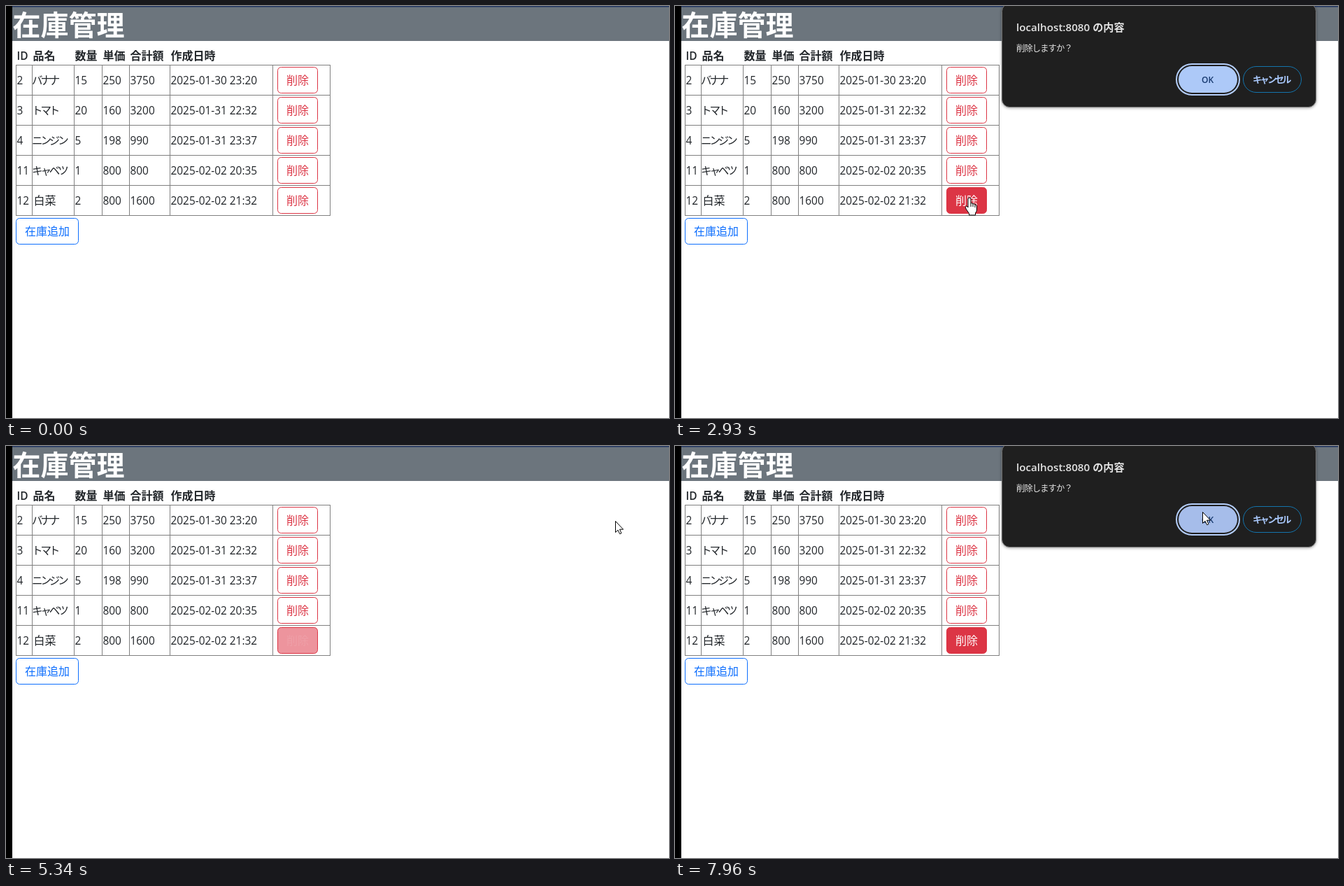
Recreate the animation shown at these times as an HTML page with a canvas. Size 948 by 589 pixels, loop 8000 ms.

```html
<!DOCTYPE html>
<html lang="ja">
<head>
<meta charset="utf-8">
<title>在庫管理</title>
<style>
  html, body { margin: 0; width: 100%; height: 100%; overflow: hidden; background: #fff; }
  canvas { display: block; }
</style>
</head>
<body>
<canvas id="stage" width="948" height="589"></canvas>
<script>
const ctx = document.getElementById("stage").getContext("2d");
const LOOP = 8000;
const FONT = '"Open Sans", "Noto Sans CJK JP", "Noto Sans CJK", sans-serif';
const RED = [220, 53, 69];

const cols = [14, 37, 97, 137, 176, 234, 381, 463];
const heads = ["ID", "品名", "数量", "単価", "合計額", "作成日時"];
const rows = [
  ["2", "バナナ", "15", "250", "3750", "2025-01-30 23:20"],
  ["3", "トマト", "20", "160", "3200", "2025-01-31 22:32"],
  ["4", "ニンジン", "5", "198", "990", "2025-01-31 23:37"],
  ["11", "キャベツ", "1", "800", "800", "2025-02-02 20:35"],
  ["12", "白菜", "2", "800", "1600", "2025-02-02 21:32"]
];
const TOP = 84, ROW = 43;

const easeOut = p => 1 - (1 - p) ** 3;
const easeBoth = p => p < 0.5 ? 2 * p * p : 1 - 2 * (1 - p) ** 2;
const linear = p => p;

// Pointer moves: first step, last step, step count, destination, easing
const startPos = [982, 614];
const moves = [
  [320, 860, 9, 439, 276, easeOut],
  [1060, 1200, 3, 422, 275, easeBoth],
  [1470, 1470, 1, 421, 275, linear],
  [3160, 3790, 10, 734, 112, easeBoth],
  [3860, 3930, 2, 758, 82, linear],
  [4130, 4540, 6, 871, 107, easeBoth],
  [5400, 5970, 9, 454, 276, easeBoth],
  [6040, 6040, 1, 451, 275, linear],
  [6110, 6320, 4, 426, 277, easeOut],
  [7000, 7550, 8, 741, 98, easeBoth],
  [7820, 7960, 3, 754, 94, linear]
];
const clicks = [[2800, 2930], [5200, 5340], [6590, 6730]];
const dialogs = [[2870, 5270], [6660, LOOP]];

const within = (t, spans) => spans.some(([a, b]) => t >= a && t < b);
const ramp = (t, from) => Math.min(1, Math.max(0, (t - from) / 150));
const inBox = (p, x, y, w, h) => p[0] >= x && p[0] <= x + w && p[1] >= y && p[1] <= y + h;

function pointerAt(t) {
  let pos = startPos;
  for (const [t0, t1, n, x, y, ease] of moves) {
    if (t < t0) break;
    const gap = n > 1 ? (t1 - t0) / (n - 1) : 1;
    const step = Math.min(n, Math.floor((t - t0) / gap + 0.01) + 1);
    const p = ease(step / n);
    pos = [Math.round(pos[0] + (x - pos[0]) * p), Math.round(pos[1] + (y - pos[1]) * p)];
  }
  return pos;
}

function text(str, x, y, size, color, weight = 400, spacing = 0) {
  ctx.font = `${weight} ${size}px ${FONT}`;
  ctx.letterSpacing = spacing + "px";
  ctx.fillStyle = color;
  ctx.fillText(str, x, y);
}

function pill(x, y, w, h, r, fill, stroke, line = 1) {
  ctx.beginPath();
  ctx.roundRect(x, y, w, h, r);
  if (fill) { ctx.fillStyle = fill; ctx.fill(); }
  if (stroke) { ctx.strokeStyle = stroke; ctx.lineWidth = line; ctx.stroke(); }
}

function deleteButton(y, fill) {
  const red = `rgb(${RED})`;
  pill(388.5, y + 0.5, 57, 37, 5, `rgba(${RED},${fill})`, red);
  const ink = RED.map(c => Math.round(c + (255 - c) * fill));
  text("削除", 401, y + 25, 16, `rgb(${ink})`, 300);
}

function drawPage(fill) {
  ctx.fillStyle = "#fff";
  ctx.fillRect(0, 0, 948, 589);
  ctx.fillStyle = "#6c757d";
  ctx.fillRect(9, 0, 939, 50);
  ctx.fillStyle = "#213560";
  ctx.fillRect(9, 0, 939, 1.5);
  ctx.fillStyle = "#000";
  ctx.fillRect(0, 0, 9, 589);
  text("在庫管理", 9.5, 42, 40, "#fff", 700);

  heads.forEach((h, i) => text(h, cols[i] + 1.5, 77, i ? 16 : 15.4, "#212529", i ? 700 : 600));

  const bottom = TOP + ROW * rows.length;
  ctx.fillStyle = "#808080";
  cols.forEach(x => ctx.fillRect(x, TOP, 1, bottom - TOP + 1));
  for (let y = TOP; y <= bottom; y += ROW) ctx.fillRect(cols[0], y, 450, 1);

  rows.forEach((row, r) => {
    const y = TOP + r * ROW;
    row.forEach((cell, c) => {
      const x = cols[c] + 1.5;
      if (/[ァ-ヶ]/.test(cell)) text(cell, x - 1.5, y + 28, 15.5, "#212529", 400, -3.1);
      else text(cell, c === 1 ? x + 1 : x, y + 28, c === 1 ? 16 : 15.4, "#212529");
    });
    deleteButton(y + 3, r === rows.length - 1 ? fill : 0);
  });

  pill(14.5, 303.5, 89, 37, 5, null, "#0d6efd");
  text("在庫追加", 27, 328, 16, "#0d6efd", 300);
}

function drawDialog(pos) {
  ctx.save();
  ctx.shadowColor = "rgba(0,0,0,.45)";
  ctx.shadowBlur = 4;
  ctx.shadowOffsetY = 1;
  pill(467.5, -3.5, 449, 148, 11, "#1f1f1f");
  ctx.restore();
  pill(467.5, -3.5, 449, 148, 11, null, "#757575");

  text("localhost:8080 の内容", 488, 35.5, 15.2, "#e3e3e3", 600);
  text("削除しますか？", 488, 65, 12.3, "#e3e3e3", 400, -0.9);

  const overOk = inBox(pos, 716, 82, 92, 46);
  const overCancel = inBox(pos, 812, 86, 84, 38);
  pill(717, 83, 90, 44, 22, null, "#b4cefa", 2);
  pill(720, 86, 84, 38, 19, overOk ? "#a6bdea" : "#adc9f8");
  text("OK", 753, 110, 12, "#17396f", 600);
  pill(812.5, 86.5, 83, 37, 18.5, overCancel ? "#353637" : null, "#1474ac");
  text("キャンセル", 826, 109.5, 13.2, "#a8c7fa", 700, -2.6);
}

const arrow = new Path2D("M.5 .5V16.5L4 13.2 6.6 18.7 9 17.7 6.5 12.2H11.6Z");
const hand = new Path2D("M-2 13V1Q-2-1 0-1T2 1V7Q4 6 5 8 7 7 8 9 10.5 8.5 10.5 11V16Q10.5 19 8.5 21V24H-.5V21.5L-5 15Q-6.5 12-4.5 11-3 11-2 13Z");
const fingers = new Path2D("M2 7V12M5 8V12M8 9V13");

function drawPointer([x, y], isHand) {
  ctx.save();
  ctx.translate(x, y);
  ctx.fillStyle = "#fff";
  ctx.strokeStyle = "#000";
  ctx.lineWidth = 1;
  ctx.lineJoin = "round";
  const shape = isHand ? hand : arrow;
  ctx.fill(shape);
  ctx.stroke(shape);
  if (isHand) ctx.stroke(fingers);
  ctx.restore();
}

function draw(t) {
  const pos = pointerAt(t);
  drawPage(ramp(t, 710) - ramp(t, 5270) + ramp(t, 6110));
  if (within(t, dialogs)) drawDialog(pos);
  if (within(t, clicks)) {
    ctx.fillStyle = "rgba(255,225,20,.55)";
    ctx.beginPath();
    ctx.arc(pos[0], pos[1] + 1, 12.5, 0, Math.PI * 2);
    ctx.fill();
  }
  if (t >= 320) drawPointer(pos, inBox(pos, 388, 259, 58, 38));
}

const begin = performance.now();
function tick() {
  draw((performance.now() - begin) % LOOP);
  requestAnimationFrame(tick);
}
tick();
</script>
</body>
</html>
```
